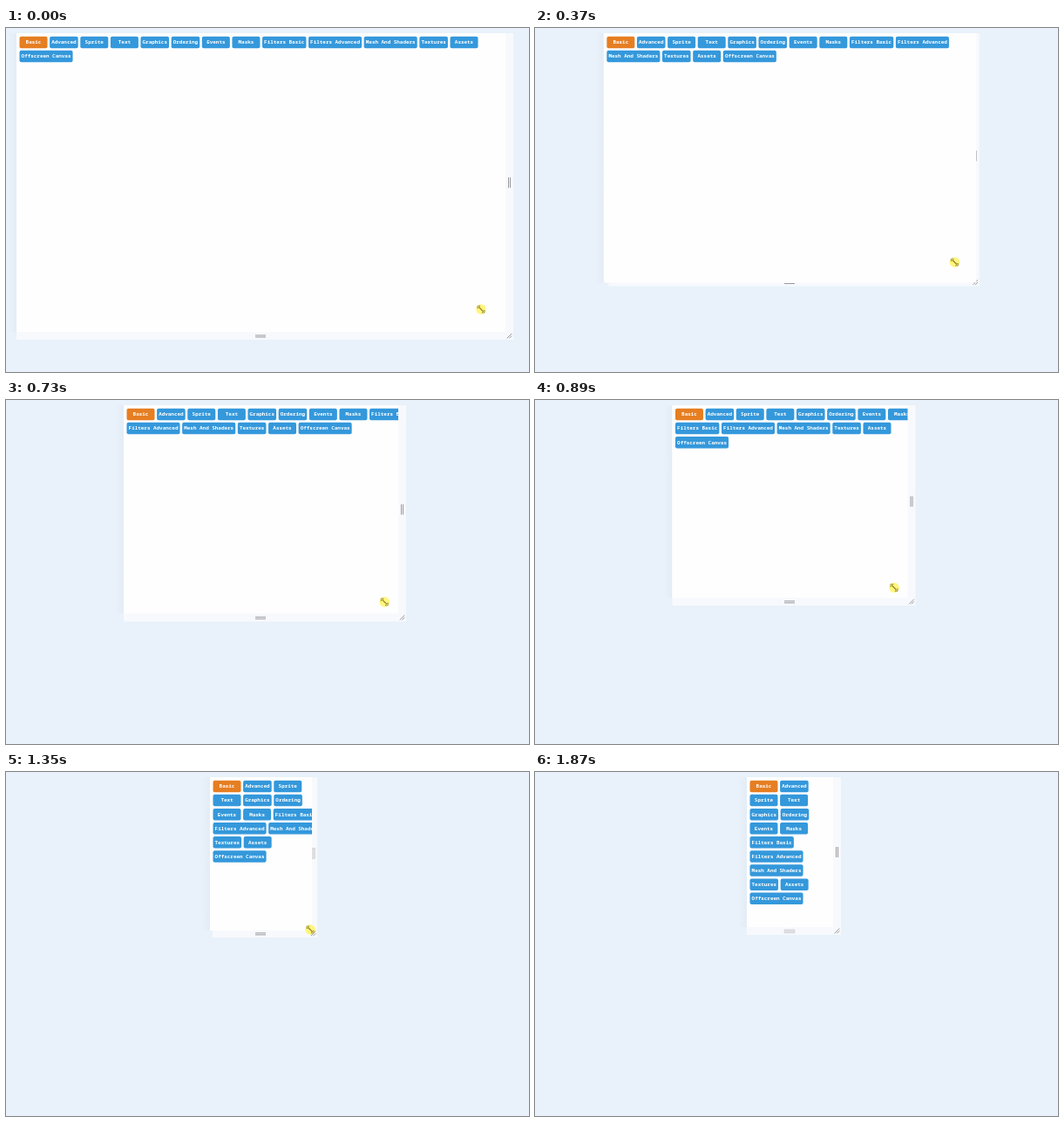
An HTML page that plays this animation: 600 px wide and 395 px high, repeating every 2430 ms.

```html
<!DOCTYPE html>
<html lang="en">
<head>
<meta charset="utf-8">
<title>Resizable preview</title>
<style>
  html, body { margin: 0; width: 100%; height: 100%; overflow: hidden; background: #e9f2fa; }
  svg { display: block; width: 600px; height: 395px; }
  text { font: 600 5.93px "Noto Sans Mono", "DejaVu Sans Mono", monospace; fill: #fff; text-anchor: middle; }
  .lines { stroke: #8f8f94; stroke-width: .9; fill: none; }
  .hover { fill: #dfdfe2; stroke: #cfcfd3; stroke-width: .6; }
</style>
</head>
<body>
<svg viewBox="0 0 600 395">
  <defs>
    <linearGradient id="shade">
      <stop offset="0" stop-color="#7070a0" stop-opacity="0"/>
      <stop offset="1" stop-color="#7070a0" stop-opacity=".045"/>
    </linearGradient>
    <clipPath id="clip"><rect id="clipRect" y="6"/></clipPath>
  </defs>
  <rect id="shadow" y="6" width="10" fill="url(#shade)"/>
  <rect id="frame" y="6" fill="#f7f9fd"/>
  <g id="rightGrip">
    <path class="lines" d="M-1-6V6M1-6V6"/>
    <rect class="hover" x="-2" y="-6" width="4" height="12"/>
  </g>
  <g id="bottomGrip">
    <path class="lines" d="M-6-1H6M-6 1H6"/>
    <rect class="hover" x="-6" y="-2" width="12" height="4" rx=".5"/>
  </g>
  <path id="corner" class="lines" d="M-2.8 2.8L2.8-2.8M-.2 2.8L2.8-.2"/>
  <rect id="page" y="6" fill="#fefefe"/>
  <g clip-path="url(#clip)"><g id="buttons"></g></g>
  <g id="cursor">
    <circle r="5.8" fill="#fff57d"/>
    <path d="M-2.5-2.5L2.5 2.5" stroke="#8a7d28" stroke-width="1.1"/>
    <path d="M-4-4h3L-4-1zM4 4h-3L4 1z" fill="#fff8b0" stroke="#8a7d28" stroke-width=".7"/>
  </g>
</svg>
<script>
const LOOP = 2430, TOP = 6, BAR = 9, SPAN = 594;
const PAD = 3.5, GAP = 2.6, ROW = 16.1, HEIGHT = 13.5;
const RELEASED = 44, GONE = 49, LAYOUT_LAG = 3;

// step, time, panel left, panel bottom, pointer x, pointer y
const KEYS = [
  [0, 0, 12, 358, 545, 323],
  [1, 50, 18, 354, 541, 320],
  [2, 90, 26, 346, 530, 310],
  [4, 170, 55, 320.5, 510, 293],
  [5, 210, 62.5, 315, 501, 285],
  [15, 580, 117, 269, 452, 245],
  [24, 890, 157.5, 236, 412, 215.5],
  [28, 1035, 185, 217, 389, 200.5],
  [29, 1070, 190, 214, 383, 197],
  [30, 1120, 197, 210, 379, 194.5],
  [34, 1251, 225, 195.5, 360, 186],
  [36, 1317, 234, 191, 352, 182],
  [37, 1350, 237, 190, 349, 181],
  [43, 1540, 243, 187, 342, 179],
  [44, 1710, 243, 187, 352, 220],
  [48, 1838, 243, 187, 393, 385],
  [49, 1870, 243, 187, 393, 385]
];
const LABELS = ["Basic", "Advanced", "Sprite", "Text", "Graphics", "Ordering", "Events", "Masks",
  "Filters Basic", "Filters Advanced", "Mesh And Shaders", "Textures", "Assets", "Offscreen Canvas"];

const el = id => document.getElementById(id);
const set = (node, attrs) => {
  for (const name in attrs) node.setAttribute(name, attrs[name]);
  return node;
};
const add = (parent, tag, attrs) =>
  parent.appendChild(set(document.createElementNS("http://www.w3.org/2000/svg", tag), attrs));
const move = (node, x, y) => set(node, { transform: `translate(${x} ${y})` });

function sample(column, value) {
  const i = KEYS.findIndex(key => key[column] > value);
  if (i < 0) return KEYS[KEYS.length - 1];
  const a = KEYS[Math.max(0, i - 1)], b = KEYS[i];
  const k = Math.max(0, (value - a[column]) / (b[column] - a[column]));
  return a.map((v, n) => v + (b[n] - v) * k);
}

function pose(step) {
  const [, , left, bottom, x, y] = sample(0, step);
  return { left, bottom, x, y, right: SPAN - left, inner: SPAN - 2 * left - BAR };
}

const buttons = LABELS.map((label, i) => {
  const width = Math.max(32, label.length * 3.56 + 4.1);
  const node = add(el("buttons"), "g", {});
  add(node, "rect", { width, height: HEIGHT, rx: 2, fill: i ? "#3498db" : "#e67e22" });
  add(node, "text", { x: width / 2, y: 8.7 }).textContent = label;
  return { node, width };
});

function wrapButtons(available) {
  let x = PAD, y = 3.7;
  for (const { node, width } of buttons) {
    if (x > PAD && x + width + PAD > available) {
      x = PAD;
      y += ROW;
    }
    move(node, x, y);
    x += width + GAP;
  }
}

function setGrip(id, x, y, hovered) {
  const grip = move(el(id), x, y);
  grip.children[0].style.display = hovered ? "none" : "";
  grip.children[1].style.display = hovered ? "" : "none";
}

function draw(t) {
  const step = Math.floor(sample(1, t)[0] + 1e-6);
  const outer = pose(step);
  // The page sometimes repaints one step after its frame.
  const page = pose(step - (step % 4 === 1 || step % 4 === 2 ? 1 : 0));
  const size = { x: page.left, width: page.inner, height: page.bottom - BAR - TOP };

  set(el("frame"), { x: outer.left, width: outer.right - outer.left, height: outer.bottom - TOP });
  set(el("shadow"), { x: page.left - 10, height: size.height });
  set(el("page"), size);
  set(el("clipRect"), size);

  setGrip("rightGrip", outer.right - 4.5, (TOP + outer.bottom - BAR) / 2, step >= 35 && step < RELEASED);
  setGrip("bottomGrip", 292, outer.bottom - 4.1, step >= RELEASED);
  move(el("corner"), outer.right - 4.5, outer.bottom - 4.5);

  move(el("buttons"), page.left, TOP);
  wrapButtons(pose(Math.max(0, step - LAYOUT_LAG)).inner);

  move(el("cursor"), outer.x, outer.y).style.display = step < GONE ? "" : "none";
}

const start = performance.now();
function tick() {
  draw((performance.now() - start) % LOOP);
  requestAnimationFrame(tick);
}
tick();
</script>
</body>
</html>
```
